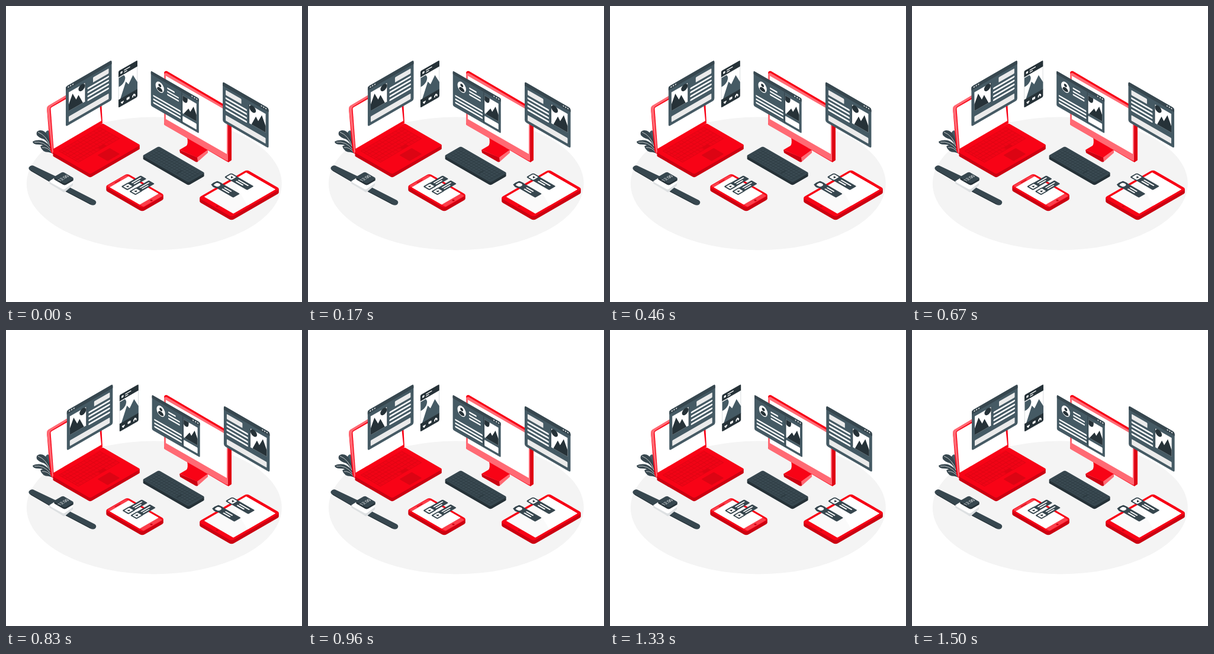
Recreate the animation shown at these times as an HTML page. Size 500 by 500 pixels, loop 1540 ms.

```html
<!DOCTYPE html>
<html lang="en">
<head>
<meta charset="utf-8">
<title>Floating windows</title>
<style>
html, body { margin: 0; width: 100%; height: 100%; overflow: hidden; background: #fff; }
svg { display: block; width: 100vw; height: 100vh; }
</style>
</head>
<body>
<svg id="stage" viewBox="0 0 500 500"></svg>
<script>
const RED = '#f80316', DEEP = '#cb0212', PINK = '#ff6a74';
const INK = '#263238', SLATE = '#37474f', GREY = '#455a64', PALE = '#ebebeb', WHITE = '#fff';

const rect = (x, y, w, h, fill, r = 0) =>
  `<rect x="${x}" y="${y}" width="${w}" height="${h}" rx="${r}" fill="${fill}"/>`;
const path = (d, fill, extra = '') => `<path d="${d}" fill="${fill}" ${extra}/>`;
const line = (d, color, width, extra = '') =>
  `<path d="${d}" fill="none" stroke="${color}" stroke-width="${width}" ${extra}/>`;
const bar = (d, width = 2.4) => line(d, WHITE, width, 'stroke-linecap="round"');
const dot = (x, y, r, fill) => `<circle cx="${x}" cy="${y}" r="${r}" fill="${fill}"/>`;
const group = (matrix, body) => `<g transform="matrix(${matrix})">${body}</g>`;

// Isometric planes: floor, and walls rising or falling to the right.
const floor = (x, y, body) => group([.866, .5, -.866, .5, x, y], body);
const rising = (x, y, body) => group([1, -.577, 0, 1, x, y], body);
const falling = (x, y, body) => group([1, .577, 0, 1, x, y], body);

function slab(x, y, w, h, depth, r, top, side, details) {
  let sides = '';
  for (let d = depth; d > 0; d--) sides += floor(x, y + d, rect(0, 0, w, h, side, r));
  return sides + floor(x, y, rect(0, 0, w, h, top, r) + details);
}

function rows(n, d, color, width, dash) {
  let out = '';
  for (let i = 0; i < n; i++) out += line(d(i), color, width, `stroke-dasharray="${dash}"`);
  return out;
}

const plant = () =>
  path('M76 240Q80 217 71 210Q65 211 67 222Z', GREY) +
  path('M76 240C74 222 68 209 57 210Q50 211 52 218Q56 223 64 225Q70 228 73 238Z', SLATE) +
  path('M77 244C73 231 60 222 45 229Q45 234 55 234Q66 234 73 242Z', SLATE) +
  path('M79 249C74 234 66 232 58 237Q61 247 72 247Z', SLATE) +
  line('M54 213Q69 219 74 237M48 230Q64 228 75 242M61 239Q70 238 77 247', PALE, .8);

const laptop = () =>
  path('M71 169L155 119Q158 118 159 121L163 198L79 250Q76 248 75 244L69 174Q69 171 71 169Z', RED) +
  path('M69 173Q69 170 72 168L155 119L157 121L76 170Q74 172 74 175L80 247L78 250Z', PINK) +
  path('M75.5 174Q75.5 172 77 171L154 127L161 194L80.5 241Z', WHITE) +
  slab(163, 198, 74, 98, 6, 3, RED, DEEP,
    rect(4, 9, 39, 81, '#dd0413') +
    rows(6, i => `M${7.5 + i * 6.4} 10V89`, '#f00416', 5.4, '5.6 .7') +
    rect(37, 34, 5, 12, '#dd0413') +
    rect(49, 35, 20, 24, '#dc0413', 1));

const monitor = () =>
  path('M293 243L324 256V263Q322 264 320 263L294 248Z', DEEP) +
  path('M323 256L341 243V248L324 263Z', PINK) +
  path('M293 243L305 236Q308 232 306 222L330 236Q334 240 341 243L323 256Z', RED) +
  path('M267 113Q268 109 272 110L378 172Q381 174 381 177V260L376 264L372 262L267 200Z', RED) +
  path('M267 114L271 113L373 173Q376 175 376 179V262L372 261L269 202Q267 201 267 198Z', PINK) +
  path('M375 179L380.5 176V261L375 263.5Z', '#dd0414') +
  path('M270 118L373 177V250L270 191Z', WHITE);

const keyboard = () =>
  slab(258, 237, 90, 32, 5, 3, SLATE, INK,
    rect(4, 3.5, 82, 25, '#2e3c43') +
    rows(5, i => `M4.5 ${6 + i * 5}H85.5`, '#3a4a52', 4, '4.2 .8') +
    rect(62, 18.5, 3, 10, '#2e3c43'));

const watch = () =>
  path('M39 272Q43 267 49 271L89 290L80 300L41 278Q37 275 39 272Z', SLATE) +
  path('M105 305L150 328Q154 331 151 335Q147 338 142 335L97 311Z', SLATE) +
  line('M42 278L78 299M101 313L143 335', INK, 1.2) +
  path('M73 297L92 284L113 297V303L101 313Q98 316 95 313L75 301Q73 300 73 297Z', '#dde0e2') +
  path('M73 296L92 284L113 297V299L101 308Q98 311 95 309L75 298Z', WHITE) +
  slab(96, 280, 22, 18.5, 3, 3, SLATE, INK, '') +
  `<text transform="matrix(.866,-.5,.866,.5,90.7,297)" font-family="Roboto, sans-serif"
    font-size="7.6" fill="#fff">12:00</text>`;

const phone = () =>
  slab(205, 283, 73, 44, 6, 5, RED, DEEP,
    rect(1, 3.5, 8, 37, '#fb3f4b', 2) +
    rect(60, 3.5, 12, 37, '#fb3f4b', 2) +
    rect(6, 3.5, 58.5, 37, WHITE, 1) +
    line('M3.6 17V28', DEEP, 1.3) + dot(68.8, 22, 1.8, DEEP));

const tablet = () =>
  slab(407, 276.5, 65, 95, 6, 5, RED, DEEP,
    rect(4, 5.5, 57, 82, '#fafafa', 1) +
    path('M4 5.5H61V60L4 32Z', WHITE) +
    dot(32, 2.6, .9, DEEP) + dot(33, 91, 1.8, DEEP));

const browser = () =>
  rect(0, 0, 77.5, 67.5, GREY, 3) +
  path('M0 6.5V3Q0 0 3 0H74.5Q77.5 0 77.5 3V6.5Z', SLATE) +
  dot(4.5, 3.1, 1, WHITE) + dot(8.2, 3.1, 1, WHITE) + dot(12, 3.1, 1, WHITE) +
  rect(5, 12.5, 28, 31.5, WHITE) +
  path('M5 44V33L11.5 18.5L17.5 32L21.5 26.5L29 44Z', INK) + dot(27, 17, 5.6, INK) +
  rect(32.5, 12.5, 1.2, 31.5, SLATE) +
  rect(46, 11, 26.5, 8.5, PALE, 1) +
  bar('M38 24.7H71.5M38 31.3H71.5M38 37.9H71.5M38 44.5H71.5', 3) +
  rect(5, 53.3, 67.5, 9.5, PALE, 1);

const profile = () =>
  rect(0, 0, 81, 59, GREY, 2) +
  path('M0 5.5V2Q0 0 2 0H79Q81 0 81 2V5.5Z', SLATE) +
  dot(69.5, 3, 1, WHITE) + dot(73.7, 3, 1, WHITE) + dot(77.5, 3, 1, WHITE) +
  `<ellipse cx="15" cy="19" rx="7.2" ry="8.6" fill="#fff"/>` +
  dot(15, 16, 2.5, INK) + path('M10.3 24.3Q10.5 19.5 15 19.5T19.7 24.3Q15 28 10.3 24.3Z', INK) +
  bar('M28.5 13.3H39M28.5 18.8H46M28.5 24H46') +
  bar('M5 39.6H49M5 45.4H49M5 51.2H49', 2.7) +
  rect(51.5, 6, 1.2, 52, SLATE) +
  rect(53.5, 11, 23.5, 30, WHITE) +
  path('M55 41L63.5 27L66.5 31L72 19L77 30V41Z', INK) +
  path('M53.5 11H62Q62.5 20 57.5 20.5Q54 20.5 53.5 18.5Z', INK) +
  rect(53.5, 45, 23.5, 10, WHITE, 1);

const mobile = () =>
  rect(0, 0, 32, 62, WHITE, 1.5) +
  line('M.3 10V50M31.7 10V50', '#c7cdd0', .6) +
  path('M.5 12H9Q13 17 10 23Q6 28 .5 27Z', GREY) +
  path('M3 49L12.5 25L17 32L24.5 21L32 37V49Z', GREY) +
  path('M0 10.5V2Q0 0 2 0H30Q32 0 32 2V10.5Z', INK) +
  path('M0 48.5H32V60Q32 62 30 62H2Q0 62 0 60Z', INK) +
  dot(5, 5.2, 1.9, WHITE) + bar('M10 4H19M10 7.2H14', 1.5) +
  path('M6.5 59L4 56Q4 53.5 6.5 55Q9 53.5 9 56Z', WHITE) +
  rect(13.7, 53.3, 5, 4, WHITE, .8) +
  path('M23.3 55.5L26 53L28.7 55.5V58.5H27V56.5H25V58.5H23.3Z', WHITE);

// Cards lie on the floor; the first climbs to the right, the second descends.
const videoCard = (x, y) => group([.866, -.5, .866, .5, x, y],
  rect(0, 0, 37.5, 11.5, SLATE, 1.5) +
  rect(-.4, -.4, 14, 12.3, SLATE, 2) + rect(1.7, 1.6, 9.6, 8.3, WHITE, 1) +
  path('M5 3.4L9 5.8L5 8.2Z', INK) +
  bar('M17 3.9H33.5M17 7.8H28', 1.9));

const noteCard = (x, y, icon, lines) => floor(x, y,
  rect(0, 0, 44, 13, SLATE, 1.5) + icon + bar(lines, 2.2));

const floating = () =>
  rising(101, 136.2, browser()) +
  rising(190, 110, mobile()) +
  falling(244.8, 109.5, profile()) +
  group([-1, -.577, 0, 1, 443.6, 172.7], browser()) +
  videoCard(195, 305) + videoCard(208.7, 313.2) +
  noteCard(357, 295.3,
    dot(6.8, 7, 7.6, SLATE) +
    path('M3 4Q7 1 10.5 4.5Q12 9 9 10.5L4 11Q2 8 3 4Z', WHITE), 'M19 4.5H31M19 8.8H31') +
  noteCard(380.5, 282.5,
    rect(-.5, -.5, 14, 14, SLATE, 3) + rect(1.6, 1.6, 9.8, 9.8, WHITE, 1.5) +
    path('M4.4 5L9 4.4L8.4 9Z', INK), 'M19 4.5H37M19 8.8H31');

const stage = document.getElementById('stage');
stage.innerHTML =
  `<ellipse cx="250.3" cy="300" rx="215.5" ry="112.5" fill="#f4f4f4"/>` +
  plant() + laptop() + monitor() + keyboard() + watch() + phone() + tablet() +
  `<g id="floating">${floating()}</g>`;

const layer = document.getElementById('floating');
const LOOP = 1540, STEP = 1000 / 24, PERIOD = 1500, PHASE = 23;
const SHAKE = [0, -1, 2, -4, 4, -4, 4, -4, 2, -1, 0];

function shake(ms) {
  const p = (ms % PERIOD) / PERIOD * 10, i = Math.floor(p);
  return SHAKE[i] + (SHAKE[i + 1] - SHAKE[i]) * (p - i);
}

// The motion advances at 24 steps per second.
function draw(now) {
  const step = Math.floor((now % LOOP + 5) / STEP);
  const x = shake(step * STEP + PHASE) - shake(PHASE);
  layer.setAttribute('transform', `translate(${x.toFixed(2)} 0)`);
}

const start = performance.now();
function tick() {
  draw(performance.now() - start);
  requestAnimationFrame(tick);
}
tick();
</script>
</body>
</html>
```
